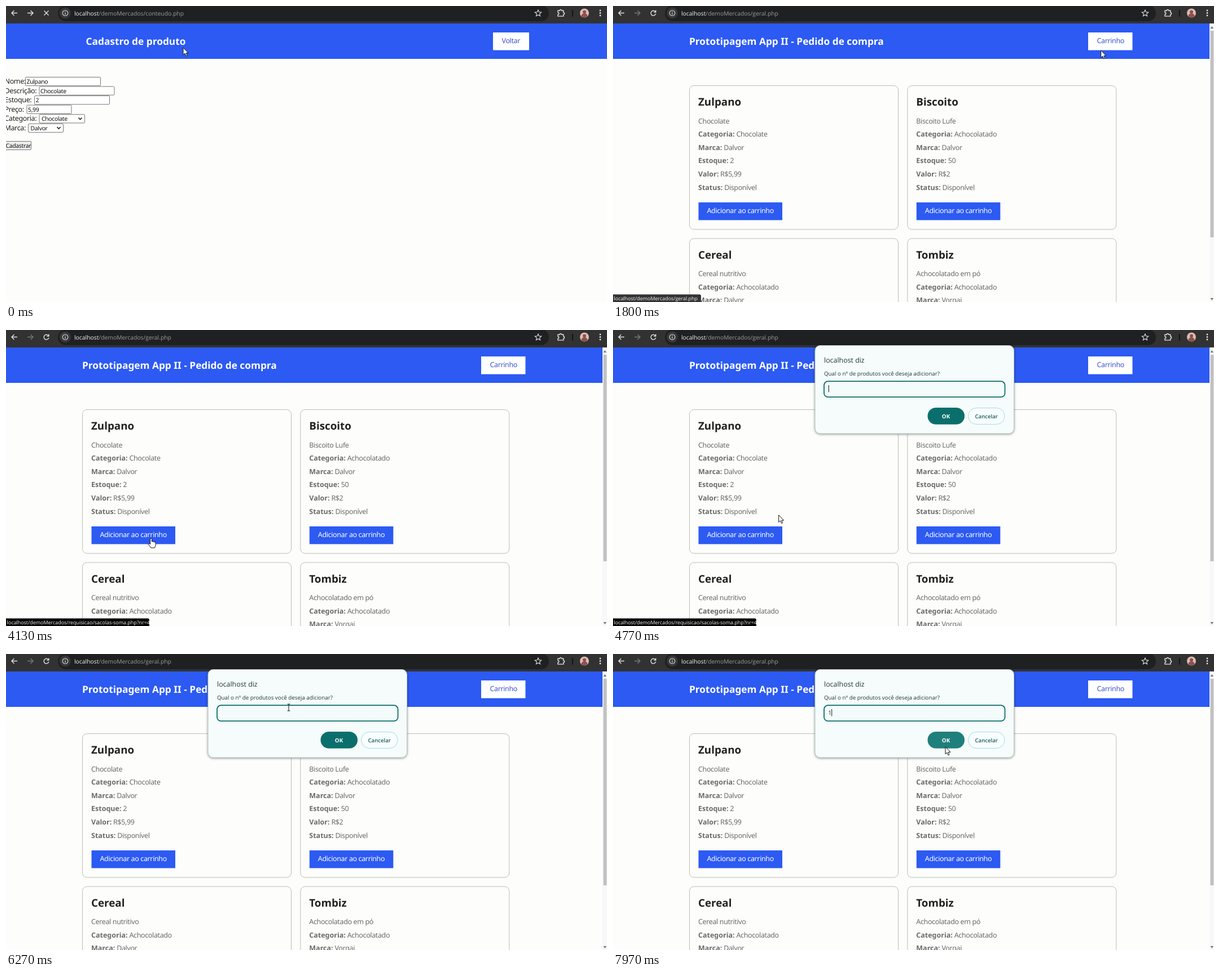
An HTML page for the animation above (8000 ms loop, 1065 px wide and 526 px high).

```html
<!DOCTYPE html>
<html lang="pt-BR">
<head>
<meta charset="utf-8">
<title>Cadastro e pedido</title>
<style>
  html, body { margin: 0; width: 100%; height: 100%; overflow: hidden; background: #fdfdfb; }
  svg { display: block; width: 1065px; height: 526px; }
  text { font: 12.5px "Noto Sans", sans-serif; letter-spacing: -.03em; fill: #6b6b6b; white-space: pre; text-rendering: geometricPrecision; }
  .b, .h1, .h2 { font-weight: 700; letter-spacing: 0; }
  .h1 { font-size: 17.3px; fill: #fff; }
  .h2 { font-size: 18.8px; fill: #212121; }
  .label { fill: #222; }
  .field { font-size: 10.4px; fill: #111; }
  .white { fill: #fff; }
  .link { fill: #3c55d0; }
  .ui { font: 10.35px "Open Sans", sans-serif; letter-spacing: 0; }
  .box { fill: #fff; stroke: #777; }
  .icon { fill: none; stroke: #e3e3e3; stroke-width: 1.4; }
</style>
</head>
<body>
<svg id="stage" viewBox="0 0 1065 526"></svg>
<script>
const LOOP = 8000, PAGE_CHANGE = 1450, DIALOG_OPEN = 4400, TYPED = 6650;
const BLUE = '#2c5af2';

const text = (x, y, content, cls = '', extra = '') =>
  `<text x="${x}" y="${y}" class="${cls}" ${extra}>${content}</text>`;
const rect = (x, y, w, h, extra) =>
  `<rect x="${x}" y="${y}" width="${w}" height="${h}" ${extra}/>`;
const path = (d, extra = 'class="icon"') => `<path d="${d}" ${extra}/>`;
const group = (id, ...parts) => `<g id="${id}">${parts.join('')}</g>`;

function toolbar() {
  const arrow = (x, dir) => path(`M${x - 5 * dir} 12.5h${10 * dir}m${-4.5 * dir} -4.5l${4.5 * dir} 4.5l${-4.5 * dir} 4.5`);
  const starPoints = Array.from({ length: 10 }, (_, i) => {
    const r = i % 2 ? 2.7 : 6, a = i * Math.PI / 5;
    return `${943 + r * Math.sin(a)} ${13 - r * Math.cos(a)}`;
  });
  return rect(0, 0, 1065, 31, 'fill="#323232"') +
    rect(92, -1, 870, 28, 'rx="13.5" fill="#1f2021"') +
    arrow(15, 1).replace('<path', '<path transform="rotate(180 15 12.5)"') +
    group('forward', arrow(43, 1)) +
    group('stop', path('M67.5 8.5l8 8m0 -8l-8 8')) +
    group('reload', path('M75.2 10.2A4.4 4.4 0 1 0 75.8 13.8M75.8 7.5v3.6h-3.6')) +
    '<circle cx="105" cy="12.5" r="10" fill="#363738"/><circle cx="105" cy="12.5" r="4.8" class="icon" style="stroke-width:1.1"/>' +
    path('M105 12v3.2M105 9.7v1.2', 'stroke="#e3e3e3" stroke-width="1.2"') +
    `<text x="121" y="16.5" class="ui" fill="#fff" style="fill:#f2f2f2">localhost<tspan id="address" fill="#9b9b9b"></tspan></text>` +
    path(`M${starPoints.join('L')}Z`, 'class="icon" style="stroke-width:1.1"') +
    path('M978 8.3h3.2a1.8 1.8 0 0 1 3.6 0h3v3.2a1.8 1.8 0 0 1 0 3.6v3h-9.8v-3a1.8 1.8 0 0 0 0 -3.6Z') +
    path('M1004 7v12', 'stroke="#0d0d0d" stroke-width="1.6"') +
    '<circle cx="1025" cy="12.5" r="8" fill="#dcbcb4"/><circle cx="1025" cy="10.5" r="3" fill="#8d504d"/>' +
    path('M1019.5 18a5.5 5 0 0 1 11 0a8 8 0 0 1 -11 0', 'fill="#8d504d"') +
    [8, 12.5, 17].map(y => `<circle cx="1053" cy="${y}" r="1.4" fill="#e3e3e3"/>`).join('');
}

const header = (x, title, linkX, linkW, link, id) =>
  rect(0, 31, 1065, 63, `fill="${BLUE}"`) + text(x, 68.7, title, 'h1') +
  rect(linkX, 47, linkW, 31.5, `id="${id}" fill="#fff"`) + text(linkX + 15.5, 66, link, 'link');

function formPage() {
  const rows = [
    ['Nome:', 'Zulpano', 34.5, 133], ['Descrição:', 'Chocolate', 59, 133],
    ['Estoque:', '2', 50.5, 133], ['Preço:', '5,99', 37, 79],
    ['Categoria:', 'Chocolate', 59, 80.5, true], ['Marca:', 'Dalvor', 39.5, 62, true],
  ];
  return header(141.5, 'Cadastro de produto', 863, 64, 'Voltar', 'backLink') +
    rows.map(([label, value, x, w, isSelect], i) => {
      const y = 126.5 + i * 16.55;
      return text(-2.5, y + 11.5, label, 'label') +
        rect(x, y, w, 15.2, 'class="box" rx="1.5"') +
        text(x + (isSelect ? 4 : 2), y + 11.7, value, 'field') +
        (isSelect ? path(`M${x + w - 11} ${y + 5.8}l3 3.2l3 -3.2`, 'fill="none" stroke="#111" stroke-width="1.5"') : '');
    }).join('') +
    rect(-3, 240.5, 47.5, 15, 'class="box" rx="1.5" style="fill:#ececec"') +
    text(-.5, 252, 'Cadastrar', 'field');
}

function card(x, y, name, description, category, brand, stock, price) {
  const details = [['Categoria', category], ['Marca', brand], ['Estoque', stock],
    ['Valor', 'R$' + price], ['Status', 'Disponível']];
  return rect(x + .5, y + .5, 370, 255.5, 'rx="8" fill="none" stroke="#bdbdb5"') +
    text(x + 16, y + 36, name, 'h2') +
    text(x + 16, y + 67.5, description) +
    details.map(([key, value], i) =>
      text(x + 16, y + 91.1 + i * 23.6, `<tspan class="b">${key}:</tspan> ${value}`)).join('') +
    rect(x + 16.5, y + 208, 148.5, 31.5, `fill="${BLUE}"`) +
    text(x + 31.5, y + 227.2, 'Adicionar ao carrinho', 'white');
}

function shopPage() {
  return header(135, 'Prototipagem App II - Pedido de compra', 842, 78.5, 'Carrinho', 'cartLink') +
    card(135, 141, 'Zulpano', 'Chocolate', 'Chocolate', 'Dalvor', 2, '5,99') +
    card(521.3, 141, 'Biscoito', 'Biscoito Lufe', 'Achocolatado', 'Dalvor', 50, 2) +
    card(135, 412.7, 'Cereal', 'Cereal nutritivo', 'Achocolatado', 'Dalvor', 20, 8) +
    card(521.3, 412.7, 'Tombiz', 'Achocolatado em pó', 'Achocolatado', 'Vorgai', 30, 7) +
    rect(1057, 31, 8, 495, 'fill="#f8f8f8"') +
    rect(1058.5, 44, 6, 367, 'fill="#c1c1c1"') +
    path('M1058.5 40l2.8 -4l2.8 4ZM1058.5 519l2.8 4l2.8 -4Z', 'fill="#777"');
}

function dialog() {
  const ink = 'style="fill:#20363a;font-size:';
  return rect(358, 27.5, 352.5, 156.5, 'rx="9" fill="#f5fcfb" stroke="#b9c4c6" style="filter:drop-shadow(0 1px 2px #0006)"') +
    text(374, 58, 'localhost diz', 'ui', ink + '12.4px;font-weight:500"') +
    text(374, 80.5, 'Qual o nº de produtos você deseja adicionar?', 'ui', ink + '9.77px"') +
    rect(374, 91.2, 320.5, 28, 'rx="7" fill="#f3fcfa" stroke="#0b6e6b" stroke-width="1.8"') +
    text(381.3, 108.3, '1', 'ui', 'id="typed" ' + ink + '10.4px"') +
    rect(0, 98, 1, 12.5, 'id="caret" fill="#111"') +
    rect(557.5, 138, 65.5, 29.8, 'id="ok" rx="14.9"') +
    text(590, 157, 'OK', 'ui', 'text-anchor="middle" style="fill:#fff;font-size:9.8px;font-weight:700"') +
    rect(629.5, 138.5, 64.5, 29, 'rx="14.5" fill="#f8fdfd" stroke="#a5d9e8"') +
    text(661.7, 156.7, 'Cancelar', 'ui', 'text-anchor="middle" style="fill:#1d5c63;font-size:9.6px;font-weight:600"');
}

const outline = 'fill="#fff" stroke="#111" stroke-width="1" stroke-linejoin="round"';
document.getElementById('stage').innerHTML =
  rect(0, 0, 1065, 526, 'fill="#fdfdfb"') +
  group('formPage', formPage()) + group('shopPage', shopPage()) + toolbar() +
  group('status',
    rect(-4, 512.5, 0, 18, 'id="statusBox" rx="3"'),
    text(1.5, 523.4, '', 'ui', 'id="statusText" style="fill:#f4f4f4;font-size:8.95px"')) +
  group('dialog', dialog()) +
  group('cursor',
    group('arrow', path('M0 0V12.8L3 10.1L5 14.8L7 13.9L5.1 9.4H9Z', outline)),
    group('hand', path('M-1.4 1.2Q0 -1 1.4 1.2V6Q2.7 5 4 6.3Q5.3 5.6 6.3 7Q7.8 6.5 8.2 8V12Q7.5 14.5 6.5 17H-.3Q-2 13.8 -4.8 10.8Q-4.3 8.4 -1.4 10.6Z', outline)),
    group('beam', path('M-2.5 -6H2.5M0 -6V6M-2.5 6H2.5', 'fill="none" stroke="#222" stroke-width="1.1"')));

const ui = Object.fromEntries([...document.querySelectorAll('[id]')].map(el => [el.id, el]));
const show = (name, visible) => ui[name].setAttribute('visibility', visible ? 'inherit' : 'hidden');
const set = (name, attribute, value) => ui[name].setAttribute(attribute, value);

// Pointer stops: time, x, y
const stops = [
  [0, 314, 74], [150, 314, 74], [900, 886, 69], [1700, 886, 69], [2600, 277, 353],
  [2750, 277, 353], [3700, 257, 370], [4600, 257, 370], [5300, 501, 95],
  [6500, 501, 95], [7130, 563, 152], [7800, 589, 165], [LOOP, 589, 165],
];

function pointerAt(t) {
  const i = stops.findIndex(stop => stop[0] > t);
  const [t0, x0, y0] = stops[i - 1], [t1, x1, y1] = stops[i];
  const p = (t - t0) / (t1 - t0), eased = p * p * (3 - 2 * p);
  return [x0 + (x1 - x0) * eased, y0 + (y1 - y0) * eased];
}

function draw(t) {
  const [x, y] = pointerAt(t);
  const over = (left, top, w, h) => x >= left && x <= left + w && y >= top && y <= top + h;
  const onShop = t >= PAGE_CHANGE, open = t >= DIALOG_OPEN;

  show('formPage', !onShop);
  show('shopPage', onShop);
  show('stop', t < 200);
  show('reload', t >= 200);
  ui.forward.style.opacity = onShop ? .4 : 1;
  ui.address.textContent = '/demoMercados/' + (onShop ? 'geral.php' : 'conteudo.php');

  const onBack = !onShop && over(863, 47, 64, 31.5);
  const onCart = onShop && !open && over(842, 47, 78.5, 31.5);
  const onAdd = onShop && !open && (over(151.5, 349, 148.5, 31.5) || over(537.8, 349, 148.5, 31.5));
  set('backLink', 'fill', onBack ? '#d5defb' : '#fff');
  set('cartLink', 'fill', onCart ? '#d5defb' : '#fff');

  const linkHint = t > 950 && t < 1900, addHint = t > 2850 && t < 5800;
  show('status', linkHint || addHint);
  ui.status.style.opacity = t > 5500 ? (5800 - t) / 300 : 1;
  ui.statusText.textContent = 'localhost/demoMercados/' + (addHint ? 'requisicao/sacolas-soma.php?nr=4' : 'geral.php');
  set('statusBox', 'width', addHint ? 258 : 160);
  set('statusBox', 'fill', addHint && t < 5200 ? '#050505' : '#343434');

  show('dialog', open);
  const typed = t >= TYPED;
  show('typed', open && typed);
  show('caret', open && (t - (typed ? TYPED : DIALOG_OPEN)) % 1000 < 500);
  set('caret', 'x', typed ? 387.2 : 381.8);
  set('ok', 'fill', open && over(566, 138, 57, 29.8) ? '#1f7f7c' : '#0a6f6c');

  const shape = onBack || onCart || onAdd ? 'hand' : open && over(373, 90, 322, 30) ? 'beam' : 'arrow';
  for (const name of ['arrow', 'hand', 'beam']) show(name, name === shape);
  set('cursor', 'transform', `translate(${x.toFixed(1)} ${y.toFixed(1)})`);
}

function tick() {
  draw(performance.now() % LOOP);
  requestAnimationFrame(tick);
}
tick();
</script>
</body>
</html>
```
